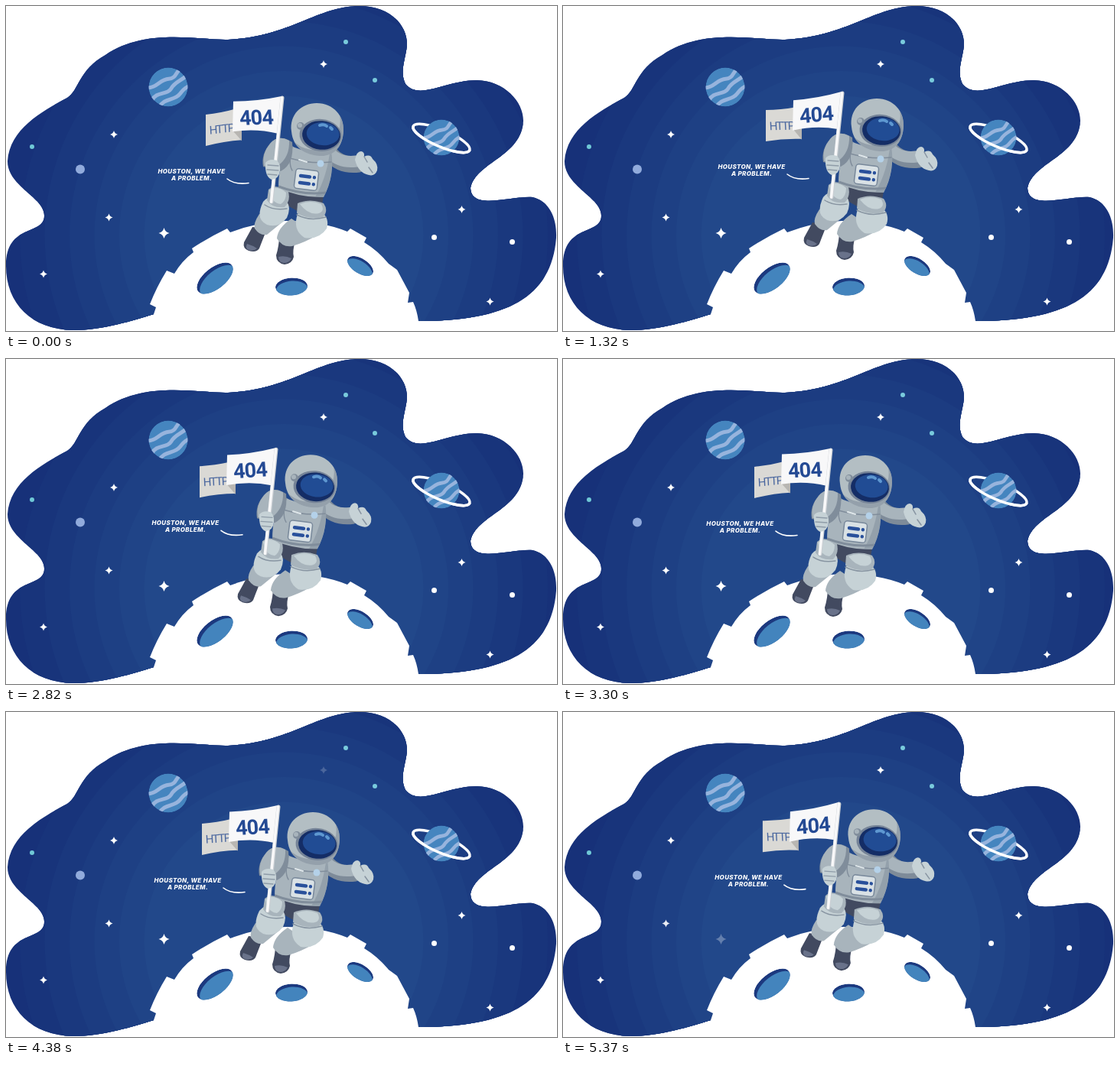
An HTML page that plays this animation: 720x425 px, repeating every 5400 ms.

```html
<!DOCTYPE html>
<html lang="en">
<head>
<meta charset="utf-8">
<title>404</title>
<style>
  html, body { margin: 0; width: 100%; height: 100%; overflow: hidden; background: #fff; }
  svg { display: block; width: 720px; height: 425px; }
  text { text-anchor: middle; }
  .speech { font: italic 800 8px Inter, sans-serif; letter-spacing: .35px; fill: #fff; }
  .code { font: 600 27px Roboto, sans-serif; letter-spacing: -.8px; fill: #244a94; }
  .http { font: 400 15px Roboto, sans-serif; letter-spacing: -1.5px; fill: #4a679f; text-anchor: start; }
  .line { fill: none; stroke-linecap: round; }
  .light { fill: #c6d2d6; }
  .mid { fill: #a8b4bc; }
  .shade { fill: #808d9b; }
  .dark { fill: #424a60; }
</style>
</head>
<body>
<svg viewBox="0 0 720 425">
  <defs>
    <clipPath id="blob">
      <path d="M193 403C166 411 127 424 88 424C33 423 0 389 0 340C0 283 50 301 50 274C49 249 2 236 2 203C5 161 45 139 80 120C95 111 95 83 130 64C183 28 252 45 290 44C372 40 407 0 462 0C502 0 525 25 524 52C522 70 514 86 522 102C540 124 575 97 615 97C652 98 676 125 676 150C674 197 614 204 607 238C608 268 660 248 688 250C710 255 720 277 719 303C713 382 653 412 539 412Z"/>
    </clipPath>
    <clipPath id="disc"><circle r="25.5"/></clipPath>
    <clipPath id="torsoClip"><path id="torso" d="M369 181Q396 196 425 189Q430 222 415 250Q384 251 356 238Q356 205 369 181Z"/></clipPath>
    <clipPath id="helmetClip"><path id="helmet" d="M373 164C370 142 386 127 406 127C428 127 442 144 441 163C440 185 428 197 410 196C392 195 375 186 373 164Z"/></clipPath>
    <clipPath id="crater"><ellipse rx="28" ry="14"/></clipPath>
    <g id="planet" clip-path="url(#disc)">
      <circle r="25.5" fill="#4585bf"/>
      <g class="line" stroke="#97b4dd" stroke-width="5" transform="rotate(-18)">
        <path d="M-28-8C-14-3-8-13 4-10S15-20 28-17"/>
        <path d="M-26 10C-16 0-5 10 3 3S17-2 28-7"/>
        <path d="M-20 22C-9 11 2 20 12 13S22 9 29 6"/>
      </g>
    </g>
    <g id="pit" clip-path="url(#crater)">
      <ellipse rx="28" ry="14" fill="#1c397f"/>
      <ellipse cx="1" cy="5" rx="28" ry="14" fill="#4384bd"/>
    </g>
  </defs>

  <g clip-path="url(#blob)">
    <rect width="720" height="425" fill="#173179"/>
    <g id="rings"></g>
  </g>
  <path fill="#fff" d="M189 426L193 403L196 394L188 390Q197 367 210 346L220 350Q230 333 245 322L243 317Q264 303 289 291L293 296Q330 282 365 281Q412 281 446 295L450 291L471 303L468 309Q486 320 500 337L511 345L527 375L525 388L532 387Q537 398 539 412V426Z"/>
  <use href="#pit" transform="translate(273 356) rotate(-38)"/>
  <use href="#pit" transform="translate(373 367) rotate(-3) scale(.75 .82)"/>
  <use href="#pit" transform="translate(463 340) rotate(32) scale(.68 .7)"/>

  <use href="#planet" x="212" y="106"/>
  <g transform="translate(569 173)">
    <ellipse class="line" stroke="#fff" stroke-width="3.5" rx="40" ry="11" transform="rotate(23)"/>
    <use href="#planet" transform="translate(0 -1) scale(.92)"/>
    <path class="line" stroke="#fff" stroke-width="3.5" transform="rotate(23)" d="M-40 0A40 11 0 0 0 40 0"/>
  </g>
  <g fill="#79cbdc"><circle cx="444" cy="47" r="3"/><circle cx="482" cy="97" r="3"/></g>
  <circle cx="97" cy="213.5" r="6" fill="#91abdc"/>
  <circle cx="661.5" cy="308.5" r="3.5" fill="#fff"/>
  <g id="stars"></g>

  <g id="hero">
    <text class="speech" x="242.5" y="218.500">HOUSTON, WE HAVE</text>
    <text class="speech" x="242.5" y="227.800">A PROBLEM.</text>
    <path class="line" d="M289 226Q299 234 317 231.500" stroke="#fff" stroke-width="1.6"/>

    <!-- flag -->
    <g id="back">
      <path d="M261 142Q281 141 299 137L308 178Q285 178 261 183Z" fill="#dad9d5"/>
      <path d="M296 165L308 162V179Z" fill="#b8b6b2"/>
      <text class="http" x="266" y="168" transform="rotate(-3 266 168)">HTTP</text>
    </g>
    <g id="front">
      <path d="M297 127.500Q329 126 360 118L355 167Q327 161 296 167Z" fill="#f8f8f9"/>
      <text class="code" x="327" y="156.500" transform="rotate(-4 327 147)">404</text>
    </g>

    <!-- far arm -->
    <path class="line" d="M424 194Q438 210 461 207" stroke="#7e8b99" stroke-width="21"/>
    <path class="line" d="M424 193Q437 206 458 203" stroke="#a8b4bc" stroke-width="15"/>
    <path class="light" d="M456 201Q458 190 464 190Q469 191 468 197Q476 193 479 200Q487 207 485 215Q482 223 474 221Q460 218 456 201Z"/>
    <path class="line" d="M468 197L472 204M479 218L474 211" stroke="#8794a1" stroke-width="1.5"/>

    <!-- legs -->
    <path class="dark" d="M365 240Q390 251 415 248L412 266L386 271L366 260Z"/>
    <path class="dark" d="M322 289Q338 291 338 299Q334 309 331 317Q327 323 317 320Q309 317 311 309Z"/>
    <path d="M315 311Q322 313 328 317Q324 321 317 319Q312 317 315 311Z" fill="#69728a"/>
    <path class="mid" d="M331 272Q323 284 325 291Q332 301 341 299L363 281Z"/>
    <path class="light" d="M336 256Q346 244 361 251Q375 259 367 277Q356 291 341 286Q325 279 336 256Z"/>
    <path class="mid" d="M343 240Q353 231 369 243Q372 255 364 263Q348 265 341 254Z"/>
    <path class="light" d="M344 241Q354 233 366 244Q366 255 359 259Q347 258 344 241Z"/>
    <path class="dark" d="M357 300Q371 302 378 308Q374 320 376 328Q374 337 364 338Q353 336 353 326Q357 313 357 300Z"/>
    <path d="M356 328Q365 326 373 330Q370 336 363 336Q356 335 356 328Z" fill="#69728a"/>
    <path class="mid" d="M373 278Q355 290 354 304Q361 316 374 314Q391 309 406 300Z"/>
    <path class="light" d="M381 272Q397 262 413 270Q423 278 419 291Q409 306 390 303Q374 293 381 272Z"/>
    <path class="mid" d="M381 258Q397 251 415 258Q422 268 414 276Q397 280 380 271Z"/>
    <path class="light" d="M384 259Q398 253 412 259Q417 268 409 271Q395 274 384 259Z"/>
    <path class="line" d="M338 260Q350 268 367 265M380 273Q397 282 418 276" stroke="#8794a1" stroke-width="1.5"/>

    <!-- torso -->
    <use href="#torso" class="mid"/>
    <g clip-path="url(#torsoClip)">
      <path class="shade" d="M424 184Q420 225 402 253H440V184Z" opacity=".5"/>
      <path class="line" d="M354 235Q386 248 419 244" stroke="#808d9b" stroke-width="3"/>
      <path class="line" d="M375 180Q368 206 374 215M371 199Q398 207 425 204" stroke="#808d9b" stroke-width="1.5"/>
    </g>
    <path class="line" d="M383 201L393 204" stroke="#dfe7ea" stroke-width="2"/>
    <circle cx="411" cy="206" r="4.5" fill="#b4d1e9"/>
    <g transform="translate(392.5 227) rotate(7)">
      <rect x="-15" y="-13" width="30" height="26" rx="4" fill="#d9e1e5" stroke="#78889a" stroke-width="1.5"/>
      <path class="line" d="M-8-4H4M-8 5H4M10-4H10M10 5H10" stroke="#29509b" stroke-width="4.5"/>
    </g>

    <!-- helmet -->
    <use href="#helmet" fill="#b3bec3"/>
    <g clip-path="url(#helmetClip)">
      <path class="shade" d="M434 132Q447 178 399 188Q384 186 374 175V202H445V132Z" opacity=".6"/>
    </g>
    <g transform="rotate(5 412 169)">
      <ellipse cx="411" cy="169" rx="27.5" ry="21" fill="#758397"/>
      <ellipse cx="412" cy="169" rx="25" ry="18.8" fill="#142d66"/>
      <ellipse cx="414" cy="167" rx="21.5" ry="15" fill="#214c94"/>
    </g>
    <path class="line" d="M410 156Q415 154 419 157M424 159L426 161" stroke="#5e98d1" stroke-width="4"/>
    <circle cx="385" cy="157" r="5" class="shade"/>
    <circle cx="384" cy="156" r="3" class="mid"/>

    <!-- near arm and pole -->
    <path class="shade" d="M374 178Q357 167 346 179Q333 193 336 210L359 216Q377 207 374 178Z"/>
    <path class="mid" d="M370 176Q355 168 345 180Q334 193 337 209L355 209Q371 198 370 176Z"/>
    <path class="line" d="M361 120L347 256" stroke="#c9ced3" stroke-width="5"/>
    <path class="line" d="M360.500 120L346.500 256" stroke="#f8f8f9" stroke-width="3.5"/>
    <path class="light" d="M339 205Q344 199 354 202Q359 207 358 215Q357 226 347 227Q338 223 339 205Z"/>
    <path class="line" d="M342 208L356 209M341 214L356 215M342 220L354 221" stroke="#8f9ca8" stroke-width="1.3"/>
  </g>
</svg>
<script>
const LOOP = 5400, FLAP = 3700, BLINK = 1900;
const $ = id => document.getElementById(id);

function add(parent, tag, attrs) {
  const el = document.createElementNS("http://www.w3.org/2000/svg", tag);
  for (const k in attrs) el.setAttribute(k, attrs[k]);
  return parent.appendChild(el);
}

for (let i = 0; i < 6; i++)
  add($("rings"), "circle", {
    cx: 363, cy: 300, r: 345 - i * 32.5,
    fill: `rgb(${24 + i * 2} ${52 + i * 4} ${123 + i * 3})`
  });

// Each star blinks once per BLINK, at its own phase
const stars = [];
function star(x, y, r, phase) {
  const d = `M0-1Q.2-.2 1 0Q.2.2 0 1Q-.2.2-1 0Q-.2-.2 0-1Z`;
  const el = add($("stars"), "path", { d, fill: "#fff", transform: `translate(${x} ${y}) scale(${r})` });
  stars.push({ el, phase });
}
function dot(cx, cy, r, phase, fill) {
  stars.push({ el: add($("stars"), "circle", { cx, cy, r, fill }), phase });
}
star(415, 76, 5, 580);
star(141, 168, 5, 100);
star(134.5, 276.5, 5, 1500);
star(206.5, 297, 7, 1560);
star(49, 350.5, 5, 1650);
star(595.5, 266, 5, 1650);
star(632.5, 386.5, 5, 1000);
dot(34, 184, 3, 1000, "#6fc8d6");
dot(559.5, 302.5, 3.5, 700, "#fff");

// Drift path: time, x, y
const keys = [[0, 0, 0], [1320, 4, -6], [2820, -8, -1.7], [3780, -12, 0], [4380, -5, 4]];

function key(i) {
  const n = keys.length, [t, x, y] = keys[(i + n) % n];
  return [t + LOOP * Math.floor(i / n), x, y];
}

// Smooth closed curve through the keys
function drift(t) {
  const i = keys.findLastIndex(k => k[0] <= t);
  const [a, b, c, d] = [-1, 0, 1, 2].map(j => key(i + j));
  const span = c[0] - b[0], u = (t - b[0]) / span;
  const ease = u * u * (3 - 2 * u);
  return [1, 2].map(k => {
    const from = (c[k] - a[k]) / (c[0] - a[0]) * span;
    const to = (d[k] - b[k]) / (d[0] - b[0]) * span;
    return b[k] + (c[k] - b[k]) * ease + u * (1 - u) * (from * (1 - u) - to * u);
  });
}

function skew(id, x, deg) {
  $(id).setAttribute("transform", `translate(${x}) skewY(${deg}) translate(${-x})`);
}

const start = performance.now();
function draw(now) {
  const t = Math.floor(Math.max(0, now - start) % LOOP / 30) * 30;
  $("hero").setAttribute("transform", `translate(${drift(t)})`);
  const wave = Math.cos(2 * Math.PI * t / FLAP);
  skew("front", 359, 2.5 * wave);
  skew("back", 261, -3.5 * wave);
  for (const { el, phase } of stars) {
    const gap = Math.abs((t - phase + 1.5 * BLINK) % BLINK - BLINK / 2);
    el.setAttribute("opacity", Math.min(1, .2 + gap / 100));
  }
  requestAnimationFrame(draw);
}
draw(start);
</script>
</body>
</html>
```
